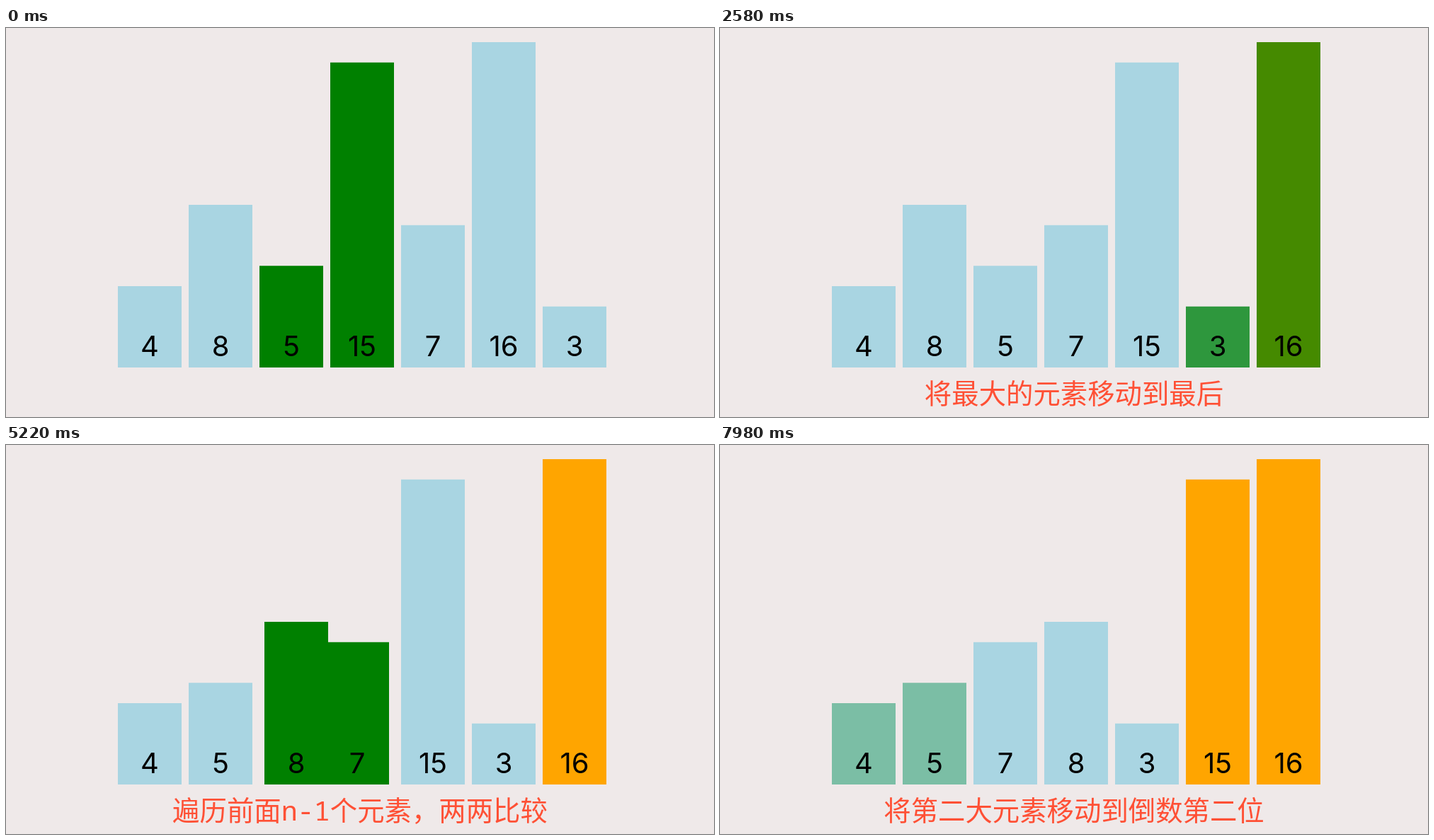
An HTML page that plays this animation: 1000 px wide and 550 px high, repeating every 8000 ms.

```html
<!DOCTYPE html>
<html lang="zh-CN">
<head>
<meta charset="utf-8">
<title>冒泡排序</title>
<style>
  html, body { margin: 0; width: 100%; height: 100%; overflow: hidden; background: #efe9e9; }
  svg { display: block; width: 1000px; height: 550px; }
  text { text-anchor: middle; }
  .bar { font: 40px Inter, "Liberation Sans", sans-serif; }
  #caption {
    font: 500 38.4px "Noto Sans Mono", "Noto Sans CJK SC", "Noto Sans CJK", sans-serif;
    fill: #ff5035;
  }
</style>
</head>
<body>
<svg viewBox="0 0 1000 550">
  <g id="bars"></g>
  <text id="caption" x="500" y="531"></text>
</svg>
<script>
const LOOP = 8000, FADE = 300, UNIT = 28.75, FLOOR = 480;
const BLUE = [169, 213, 226], GREEN = [0, 128, 0], ORANGE = [255, 165, 0];
const values = [4, 8, 5, 15, 7, 16, 3];

// [start, colour, bars that fade to it]
const paints = [
  [250, BLUE, 5], [250, GREEN, 7],
  [1150, BLUE, 7], [1150, GREEN, 16],
  [1600, GREEN, 3], [1620, BLUE, 15],
  [2500, BLUE, 3], [2500, ORANGE, 16],
  [3400, GREEN, 4, 8],
  [3850, BLUE, 4], [3850, GREEN, 5],
  [4750, BLUE, 5], [4750, GREEN, 7],
  [5500, BLUE, 7], [5500, GREEN, 15],
  [6060, BLUE, 8], [6060, GREEN, 3],
  [7000, BLUE, 3], [7000, ORANGE, 15],
  [7900, GREEN, 4, 5]
];

// [start, bar going right, bar going left]
const swaps = [
  [700, 15, 7], [2050, 16, 3], [4300, 8, 5], [5200, 8, 7], [6550, 15, 3]
];

const captions = [
  [0, ''], [60, '将最大的元素移动到最后'],
  [3000, ''], [3720, '遍历前面n-1个元素，两两比较'],
  [5520, ''], [6000, '将第二大元素移动到倒数第二位']
];

function add(parent, tag, attrs) {
  const el = document.createElementNS('http://www.w3.org/2000/svg', tag);
  for (const key in attrs) el.setAttribute(key, attrs[key]);
  return parent.appendChild(el);
}

const caption = document.getElementById('caption');
const bars = values.map((value, slot) => {
  const group = add(document.getElementById('bars'), 'g', { class: 'bar' });
  const height = value * UNIT;
  const rect = add(group, 'rect', { y: FLOOR - height, width: 90, height });
  add(group, 'text', { x: 45, y: 464 }).textContent = value;
  return { value, slot, group, rect };
});

const progress = (t, start) => Math.min(1, Math.max(0, (t - start) / FADE));

function draw(t) {
  for (const { value, slot, group, rect } of bars) {
    let place = slot;
    for (const [start, right, left] of swaps) {
      const p = progress(t, start);
      if (value === right) place += p;
      if (value === left) place -= p;
    }
    let colour = value === 5 || value === 15 ? GREEN : BLUE;
    for (const [start, goal, ...targets] of paints) {
      if (!targets.includes(value)) continue;
      const p = progress(t, start);
      colour = colour.map((c, i) => c + (goal[i] - c) * p);
    }
    group.setAttribute('transform', `translate(${158 + place * 100} 0)`);
    rect.setAttribute('fill', `rgb(${colour.map(Math.round)})`);
  }
  const line = captions.filter(([start]) => start <= t).pop()[1];
  if (caption.textContent !== line) caption.textContent = line;
}

const begin = performance.now();
function tick() {
  draw((performance.now() - begin) % LOOP);
  requestAnimationFrame(tick);
}
tick();
</script>
</body>
</html>
```
